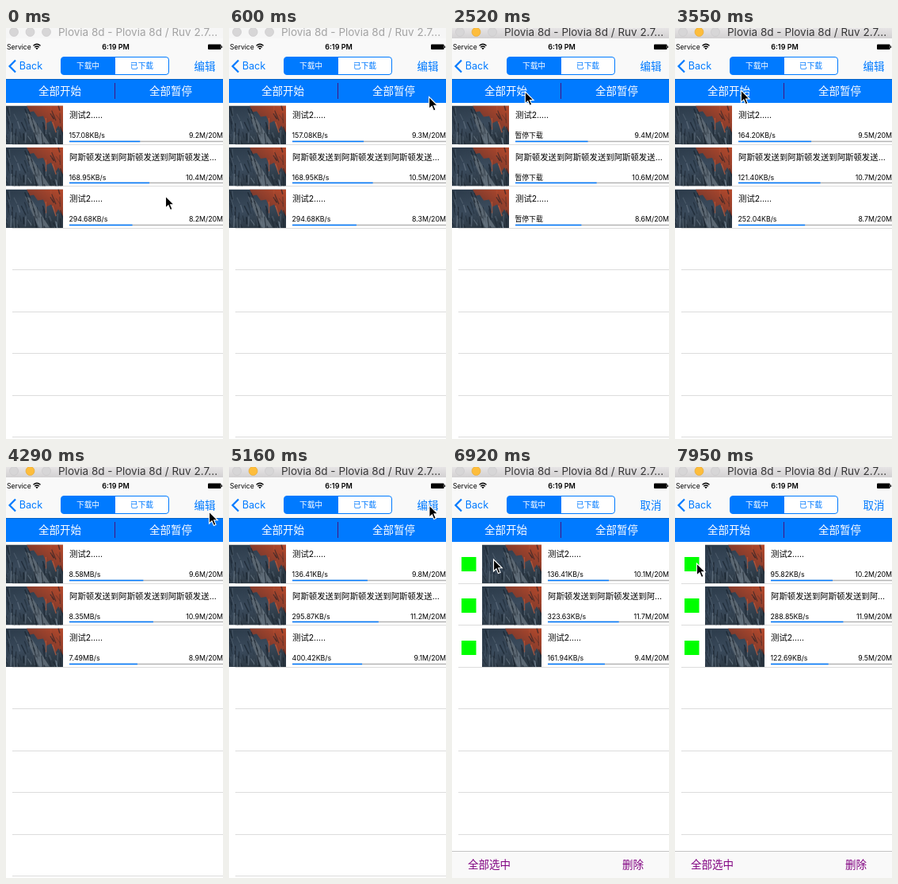
Animation, 274 px wide and 516 px high, one loop 8000 ms. Source, as an HTML page:

```html
<!DOCTYPE html>
<html lang="zh-CN">
<head>
<meta charset="utf-8">
<style>
html, body { margin: 0; width: 100%; height: 100%; overflow: hidden; background: #fff; }
svg { display: block; width: 100vw; height: 100vh; }
text { font-family: Inter, "Noto Sans CJK SC", "Noto Sans CJK", sans-serif; white-space: pre; }
</style>
</head>
<body>
<svg viewBox="0 0 274 516">
  <defs>
    <linearGradient id="wood" x2="0.4" y2="1">
      <stop offset="0" stop-color="#2b3a49"/><stop offset=".6" stop-color="#3a4a5b"/><stop offset="1" stop-color="#2c3843"/>
    </linearGradient>
    <linearGradient id="rust" x1="1" y1="0" x2="0.2" y2="0.8">
      <stop offset="0" stop-color="#b84a2c"/><stop offset=".6" stop-color="#8a3d2c"/><stop offset="1" stop-color="#513a3c"/>
    </linearGradient>
    <linearGradient id="bar" x2="0" y2="1">
      <stop offset="0" stop-color="#e6e4e5"/><stop offset="1" stop-color="#d3d1d2"/>
    </linearGradient>
    <clipPath id="crop"><rect width="75" height="48.5"/></clipPath>
    <g id="photo" clip-path="url(#crop)"></g>
  </defs>
  <g id="scene"></g>
</svg>
<script>
const LOOP = 8000, STEP = 147.2, BLUE = '#007aff';
const PAUSE = 11, RESUME = 22;
const $ = id => document.getElementById(id);
const clamp = (v, lo, hi) => Math.min(hi, Math.max(lo, v));
const ease = f => f * f * (3 - 2 * f);

// Pointer moves: start tick, end tick, x, y
const moves = [
  [0, 5, 258, 72], [5, 9, 215, 79], [14, 18, 69, 80], [23, 29, 256, 56],
  [31, 38, 250, 43], [44, 47, 52, 116], [47, 51, 27, 121]
];
// Megabytes loaded per row, by running tick
const loaded = [
  [0, 9.2, 10.42, 8.2], [11, 9.44, 10.58, 8.6], [31, 9.97, 11.56, 9.34], [43, 10.2, 11.95, 9.5]
];
const speeds = [
  '157.08KB/s 168.95KB/s 294.68KB/s', '164.20KB/s 121.40KB/s 252.04KB/s',
  '8.58MB/s 8.35MB/s 7.49MB/s', '136.41KB/s 295.87KB/s 400.42KB/s',
  '136.41KB/s 323.63KB/s 161.94KB/s', '95.82KB/s 288.85KB/s 122.69KB/s'
].map(s => s.split(' '));

function pointer(n) {
  let x = 201, y = 211;
  for (const [from, to, tx, ty] of moves) {
    const f = ease(clamp((n - from) / (to - from), 0, 1));
    x += (tx - x) * f;
    y += (ty - y) * f;
  }
  return [x, y];
}

function sizesAt(run) {
  const i = clamp(loaded.findIndex(k => k[0] > run), 1, 3) || 3;
  const a = loaded[run >= 43 ? 2 : i - 1], b = loaded[run >= 43 ? 3 : i];
  return [1, 2, 3].map(r => a[r] + (b[r] - a[r]) * (run - a[0]) / (b[0] - a[0]));
}

const rect = (x, y, w, h, fill, more = '') =>
  `<rect x="${x}" y="${y}" width="${w}" height="${h}" fill="${fill}" ${more}/>`;
const text = (s, x, y, size, fill = '#000', more = '') =>
  `<text x="${x}" y="${y}" font-size="${size}" fill="${fill}" ${more}>${s}</text>`;
const MID = 'text-anchor="middle"', END = 'text-anchor="end"';

function photo() {
  let seed = 7;
  const rnd = () => (seed = seed * 16807 % 2147483647) / 2147483647;
  const streak = (x, y, dx, dy, color) =>
    `<path d="M${x} ${y}l${dx} ${dy}" stroke="${color}" stroke-opacity="${.3 + .4 * rnd()}" stroke-width="${.6 + rnd()}"/>`;
  let out = rect(0, 0, 75, 48.5, 'url(#wood)') +
    '<path d="M29 0H75V34L69 25L66 30L60 19L54 22L50 13L43 14L38 7L33 8Z" fill="url(#rust)"/>' +
    '<path d="M27 9L34 11L58 48H44Z" fill="#5b6772"/>';
  for (let i = 0; i < 70; i++) {
    const x = 75 * rnd(), y = 48 * rnd(), red = y < (x - 28) * .7;
    const tone = rnd() < .6 ? '#141d27' : red ? '#d0603c' : '#71808e';
    out += streak(x, y, 7 * rnd() - 1, 6 + 10 * rnd(), tone);
  }
  return out;
}

function titleBar(active) {
  const light = (x, fill, edge) => `<circle cx="${x}" cy="5" r="5.5" fill="${fill}" stroke="${edge}" stroke-width=".6"/>`;
  const grey = x => light(x, '#d7d6d7', '#c8c7c8');
  return rect(0, 0, 274, 13, active ? 'url(#bar)' : '#f6f6f6') +
    grey(10) + (active ? light(30.5, '#fdbd3c', '#e2a430') : grey(30.5)) + grey(51) +
    text('Plovia 8d - Plovia 8d / Ruv 2.7...', 66, 9.6, 13.5, active ? '#383838' : '#a3a3a3');
}

function navBar(editing) {
  return rect(0, 13, 274, 52, '#f9f9f9') +
    text('Service', 1, 27, 8.6) +
    `<path d="M34.5 22.3Q39 18.3 43.5 22.3M36.2 24.2Q39 21.8 41.8 24.2" fill="none" stroke="#000" stroke-width="1.3"/>
     <path d="M37.3 25.3Q39 24 40.7 25.3L39 27.2Z"/>` +
    text('6:19 PM', 138.5, 27, 9, '#000', MID + ' font-weight="600"') +
    rect(255, 20.5, 16.5, 6.5, '#000', 'rx="1"') + rect(272, 22.5, 1, 2.5, '#000') +
    `<path d="M12 40.5L4.5 48L12 55.5" fill="none" stroke="${BLUE}" stroke-width="2.2"/>` +
    text('Back', 16.7, 52.3, 12.6, BLUE) +
    rect(69.5, 36.5, 136, 22, '#fff', `rx="3.5" stroke="${BLUE}"`) +
    `<path d="M138 36.5H73Q69.5 36.5 69.5 40V55Q69.5 58.5 73 58.5H138Z" fill="${BLUE}"/>` +
    text('下载中', 103.5, 51.3, 9.7, '#fff', MID) + text('已下载', 171.5, 51.3, 9.7, BLUE, MID) +
    text(editing ? '取消' : '编辑', 237.5, 53, 13.5, BLUE) +
    rect(0, 64, 274, 30, BLUE) + rect(0, 64, 274, .7, '#0a56a8') + rect(137, 69, 1, 20, '#45127f') +
    text('全部开始', 41, 84, 13.5, '#fff') + text('全部暂停', 181, 84, 13.5, '#fff');
}

function row(i, edit, speed, size) {
  const y = 52.5 * i, dx = 41 * edit, x = 80 + dx, w = 274 - x;
  const long = '阿斯顿发送到阿斯顿发送到阿' + (edit ? '...' : '斯顿发送...');
  const lineY = Math.floor(142 + y) - .3;
  return (edit ? rect(12 - 30 * (1 - edit), Math.floor(113 + y), 18.5, 18, '#0f0') : '') +
    `<use href="#photo" x="${dx - 3}" y="${97.5 + y}"/>` +
    text(i === 1 ? long : '测试2.....', x, 113 + y, 10.4) +
    text(speed, x - .5, 138.2 + y, 8.8) +
    text(size.toFixed(1) + 'M/20M', 274, 138.2 + y, 8.8, '#000', END) +
    rect(x, lineY, w, 1.5, '#b4b4b4') + rect(x, lineY, w * size / 20, 1.5, BLUE);
}

function toolbar(edit) {
  return `<g transform="translate(0 ${34 * (1 - edit)})">` +
    rect(0, 482, 274, 34, '#f9f9f9') + rect(0, 482, 274, 1, '#c4c4c4') +
    text('全部选中', 20, 504, 13.5, '#800080') + text('删除', 215, 504, 13.5, '#800080') + '</g>';
}

function draw(n) {
  const run = n - clamp(n - PAUSE, 0, RESUME - PAUSE);
  const paused = n >= PAUSE && n < RESUME - 1;
  const speed = speeds[Math.floor((run + 2) / 8.5)];
  const edit = clamp((n - 43) / 2, 0, 1), [x, y] = pointer(n);
  let out = rect(0, 0, 274, 516, '#fff');
  for (let i = 0; i < 8; i++) out += rect(8, Math.floor(146 + 52.5 * i), 266, 1, '#dcdcdc');
  sizesAt(run).forEach((size, i) => out += row(i, edit, paused ? '暂停下载' : speed[i], size));
  out += titleBar(n >= 10) + navBar(edit > 0);
  if (edit) out += toolbar(edit);
  out += `<path transform="translate(${x} ${y})" d="M.5 0V15L4 11.8L6.4 17.5L9 16.4L6.6 10.8H11.3Z"
    stroke="#fff" stroke-width="1.1"/>`;
  $('scene').innerHTML = out;
}

$('photo').innerHTML = photo();
let shown = -1;
function frame() {
  const n = Math.floor((performance.now() % LOOP + 5) / STEP);
  if (n !== shown) draw(shown = n);
  requestAnimationFrame(frame);
}
frame();
</script>
</body>
</html>
```
